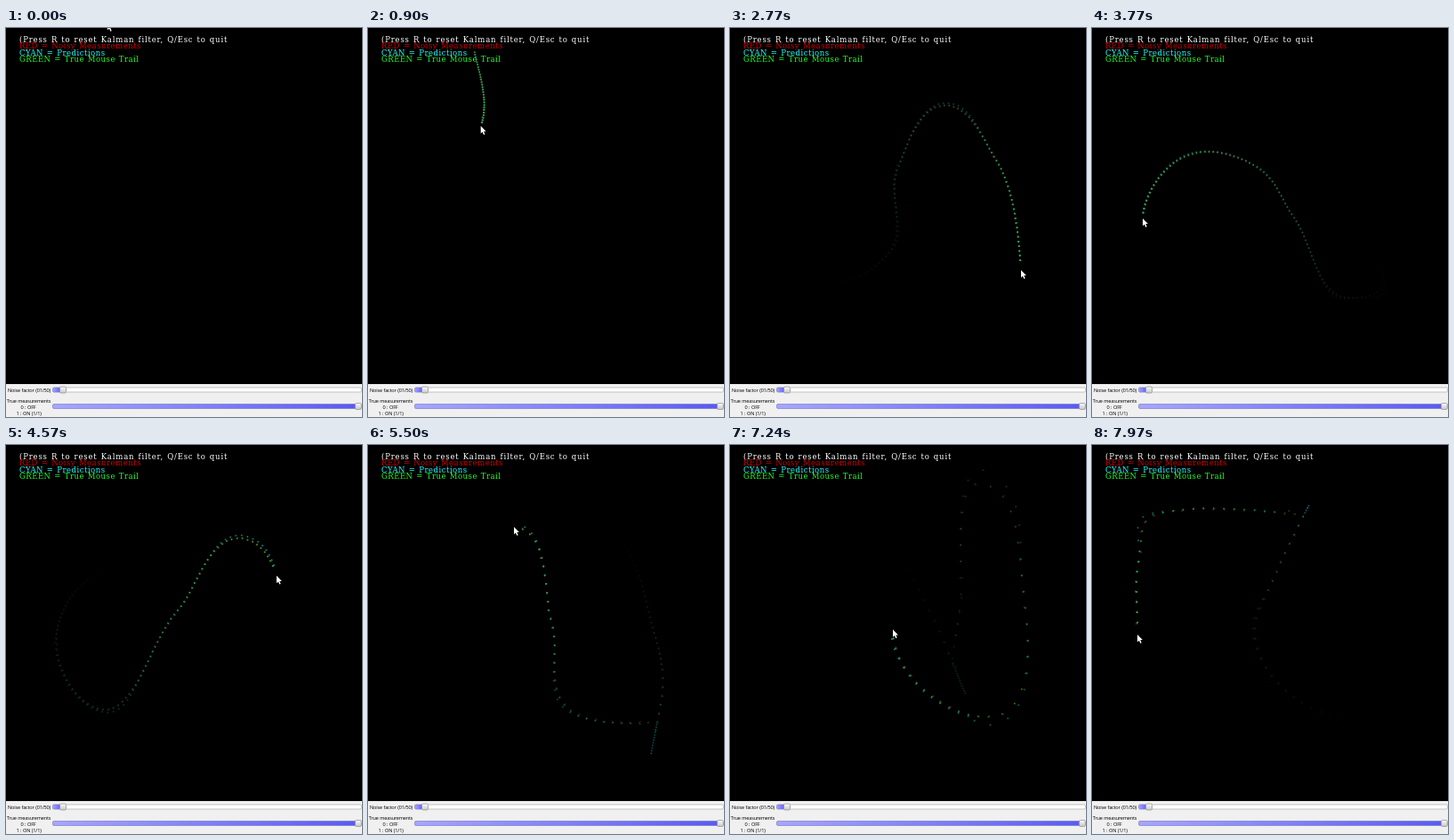
Recreate the animation shown at these times as an HTML page. Size 400x437 px, loop 8 s.

```html
<!DOCTYPE html>
<html lang="en">
<head>
<meta charset="utf-8">
<title>Mouse tracking filter</title>
<style>
  html, body { margin: 0; width: 100%; height: 100%; overflow: hidden; background: #000; }
  svg { display: block; width: 100%; height: 100%; }
  .legend { font: 8.5px "DejaVu Serif", serif; letter-spacing: .5px; word-spacing: .6px; }
  .legend .wide { letter-spacing: .82px; }
  .label { font: 5.6px "Open Sans", sans-serif; letter-spacing: -.2px; word-spacing: .4px; text-anchor: middle; }
</style>
</head>
<body>
<svg viewBox="0 0 400 437">
  <defs>
    <linearGradient id="fill">
      <stop offset="0" stop-color="#a6a6ff"/>
      <stop offset="1" stop-color="#5a5af2"/>
    </linearGradient>
    <linearGradient id="thumb" x2="0" y2="1">
      <stop offset="0" stop-color="#fafafa"/>
      <stop offset="1" stop-color="#c8c8c8"/>
    </linearGradient>
  </defs>
  <rect width="400" height="437"/>
  <g class="legend">
    <text class="wide" x="15" y="16" fill="#fff">(Press R to reset Kalman filter, Q/Esc to quit</text>
    <text x="15" y="23" fill="#d00000">RED = Noisy Measurements</text>
    <text x="15" y="31" fill="#2ff">CYAN = Predictions</text>
    <text x="15" y="38" fill="#2f2">GREEN = True Mouse Trail</text>
  </g>
  <g id="trail"></g>
  <rect y="400" width="400" height="37" fill="#f0f0f0"/>
  <g class="label">
    <text x="26" y="409">Noise factor (01/50)</text>
    <text x="25.5" y="421">True measurements</text>
    <text x="25" y="428">0 : OFF</text>
    <text x="25.5" y="435">1 : ON (1/1)</text>
  </g>
  <g id="sliders"></g>
  <path id="cursor" d="M0 0V8.4L1.9 6.6 3.3 9.8 4.7 9.2 3.3 6.1H5.9Z" fill="#fff"/>
</svg>
<script>
const LOOP = 8000, LIFE = 16, LAG = 0.2, FIRST = -1, LAST = 112;
const $ = id => document.getElementById(id);

// Key points of each sweep and the step at which it ends.
// A third value marks a sharp corner and how far the prediction overshoots it.
const sweeps = [
  { end: 16, points: [[114, -6], [122, 120], [62, 167], [46, 212], [54, 243]] },
  { end: 34, points: [[110, 285], [180, 250], [188, 160], [243, 87], [297, 145], [327, 272]] },
  { end: 49, points: [[328, 288], [290, 303], [228, 215], [190, 160], [108, 143], [57, 214]] },
  { end: 75, points: [[100, 295], [190, 190], [265, 105], [320, 205], [331, 270], [325, 311, 36], [222, 294], [207, 205], [164, 92]] },
  { end: 90, points: [[108, 114], [93, 170], [65, 262, 0], [90, 75, 32], [150, 92], [249, 243, 40], [257, 193]] },
  { end: 97, points: [[290, 45], [328, 150], [295, 305]] },
  { end: LAST, points: [[230, 285], [183, 210], [204, 150], [238, 79, 14], [95, 74], [66, 80], [53, 125], [51, 213]] }
];
const knots = sweeps.flatMap(s => s.points);

// Direction of the circle through a knot and its neighbours
function heading(i) {
  const [x, y, corner] = knots[i];
  if (corner !== undefined) return [0, 0];
  const [ax, ay] = knots[i - 1] || knots[i], [bx, by] = knots[i + 1] || knots[i];
  const p = (x - ax) ** 2 + (y - ay) ** 2 || 1, q = (bx - x) ** 2 + (by - y) ** 2 || 1;
  const dx = (x - ax) / p + (bx - x) / q, dy = (y - ay) / p + (by - y) / q;
  const len = Math.hypot(dx, dy);
  return [dx / len, dy / len];
}

function curve(i, u) {
  const a = knots[i], b = knots[i + 1], from = heading(i), to = heading(i + 1);
  const size = Math.hypot(b[0] - a[0], b[1] - a[1]), v = 1 - u;
  return [0, 1].map(n => a[n] * (1 + 2 * u) * v * v + b[n] * u * u * (3 - 2 * u)
    + size * u * v * (from[n] * v - to[n] * u));
}

// Polyline with even speed within each sweep
function buildPath() {
  const path = [{ x: knots[0][0], y: knots[0][1], k: FIRST, len: 0 }];
  let i = 0, first = 0, knot = -1;
  for (const { end, points } of sweeps) {
    knot += points.length;
    for (; i < knot; i++) {
      for (let j = 1; j <= 20; j++) {
        const [x, y] = curve(i, j / 20), p = path[path.length - 1];
        path.push({ x, y, len: p.len + Math.hypot(x - p.x, y - p.y) });
      }
    }
    const a = path[first], b = path[path.length - 1];
    for (const p of path.slice(first + 1))
      p.k = a.k + (end - a.k) * (p.len - a.len) / (b.len - a.len);
    first = path.length - 1;
  }
  return path;
}

const path = buildPath();

function at(k) {
  k = Math.max(FIRST, Math.min(LAST, k));
  const i = Math.max(1, path.findIndex(p => p.k >= k - 1e-6));
  const a = path[i - 1], b = path[i], u = (k - a.k) / (b.k - a.k);
  return [a.x + (b.x - a.x) * u, a.y + (b.y - a.y) * u];
}

function noise(n) {
  const s = Math.sin(n * 12.9898) * 43758.5453;
  return (s - Math.floor(s)) * 2 - 1;
}

const dots = [];
const addDot = (k, x, y, color, gain) => dots.push({ k, x, y, color, gain });

function addSamples() {
  for (let k = 1, n = 1; k <= LAST; k += k < 64 ? 0.17 : 0.28, n++) {
    const [x, y] = at(k), [px, py] = at(k - 0.3), [qx, qy] = at(k - 0.6);
    const spread = k < 64 ? 0.8 : 1.5;
    addDot(k, x + noise(n) * spread, y + noise(n + 0.5) * spread, "#d03018", 0.55);
    addDot(k, 2 * px - qx, 2 * py - qy, "#18b8c8", 0.7);
    addDot(k, x, y, "#20d040", 0.75);
  }
}

function addOvershoots() {
  knots.forEach(([x, y, reach], i) => {
    if (!reach) return;
    const corner = path[i * 20], before = path[i * 20 - 8];
    const angle = Math.atan2(y - before.y, x - before.x);
    for (let r = 3; r <= reach; r += 3)
      addDot(corner.k + r * 0.025, x + r * Math.cos(angle), y + r * Math.sin(angle), "#18c0d0", 1);
  });
}

function stepAt(t) {
  if (t < 500) return FIRST;
  const u = t - 500;
  return Math.floor(u / 200) * 3 + Math.min(2, Math.floor(u % 200 / 70));
}

function slider(y, end) {
  const bar = (width, style) => `<rect x="52.5" y="${y}" width="${width}" height="5" rx="1.5" ${style}/>`;
  return bar(347, 'fill="#fff" stroke="#b4b4b4" stroke-width=".8"')
    + bar(end - 52.5, 'fill="url(#fill)" stroke="#7878d0" stroke-width=".5"')
    + `<rect x="${end - 1.5}" y="${y - 1}" width="7" height="7" rx="1.5" fill="url(#thumb)" stroke="#8c8c8c" stroke-width=".7"/>`;
}

let shown = null;
function draw(k) {
  if (k === shown) return;
  shown = k;
  let out = "";
  for (const d of dots) {
    const age = k - LAG - d.k;
    if (age < 0 || age > LIFE) continue;
    const alpha = d.gain * (1 - age / LIFE) ** 1.4;
    out += `<circle cx="${d.x.toFixed(1)}" cy="${d.y.toFixed(1)}" r="1" fill="${d.color}" opacity="${alpha.toFixed(3)}"/>`;
  }
  $("trail").innerHTML = out;
  const [x, y] = at(k);
  $("cursor").setAttribute("transform", `translate(${x.toFixed(1)} ${y.toFixed(1)})`);
}

addSamples();
addOvershoots();
$("sliders").innerHTML = slider(404, 62) + slider(422.5, 393.8);

const start = performance.now();
function tick() {
  draw(stepAt((performance.now() - start) % LOOP));
  requestAnimationFrame(tick);
}
tick();
</script>
</body>
</html>
```
